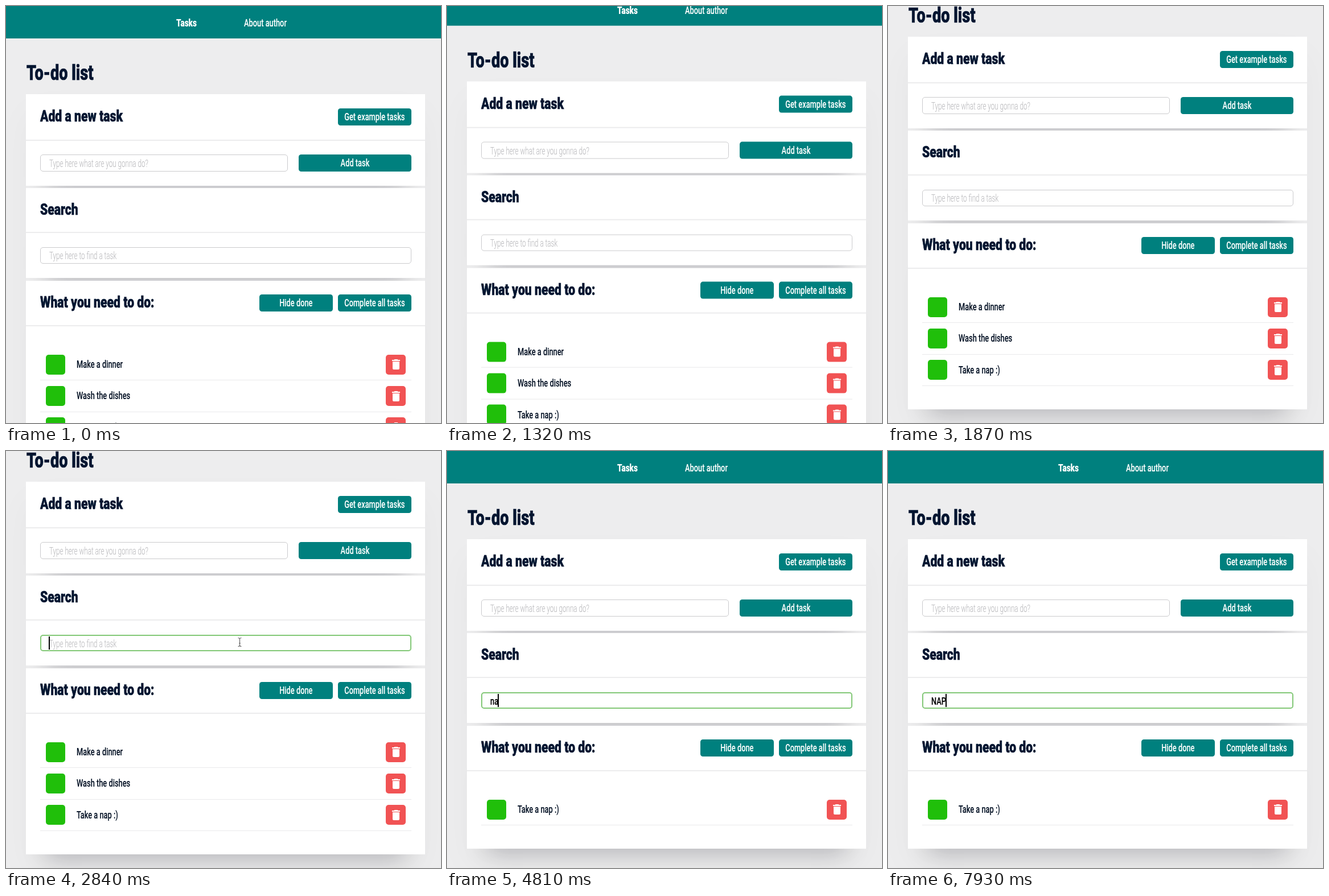
Write an HTML page that moves like this. It is 764 px wide and 733 px high and loops after 8000 ms.

```html
<!DOCTYPE html>
<html lang="en">
<head>
<meta charset="utf-8">
<title>To-do list</title>
<style>
* { box-sizing: border-box; margin: 0; }
html, body { width: 100%; height: 100%; overflow: hidden; background: #ededee; }
body { position: relative; font: 500 18.2px/1 Roboto, sans-serif; color: #061326; }
[hidden] { display: none !important; }
#page { position: absolute; top: 0; left: 0; width: 764px; padding-bottom: 24px; }

/* one condensed cut per weight */
i { display: inline-block; font-style: normal; white-space: nowrap; transform: scaleX(.705); transform-origin: 0 50%; -webkit-text-stroke: .15px; }
h1 i, b i { transform: scaleX(.745); }
h2 i { transform: scaleX(.775); }
h1, h2, b { font-weight: 900; color: #021530; }
h1 i, h2 i { -webkit-text-stroke: .6px; }
h1 { font-size: 36.5px; position: absolute; left: 35.5px; top: 100px; }
h2 { font-size: 27.3px; }

nav { height: 57.3px; background: #00807e; position: relative; }
nav * { color: #fff; }
nav > * { position: absolute; top: 20.5px; }
main { margin: 98px 0 0 35.4px; width: 701px; box-shadow: 0 30px 60px rgba(0, 0, 20, .03); }
section { background: #fff; margin-bottom: 4.7px; box-shadow: 0 44px 40px -36px rgba(0, 0, 20, .22); }
section:last-child { margin: 0; }
header, .body { padding: 0 24.5px; display: flex; align-items: center; gap: 9.5px; }
header { border-bottom: 2px solid #ececed; }
header h2 { flex: 1; white-space: nowrap; }
.body { height: 78.9px; gap: 19.5px; }

.btn { width: 128.5px; height: 29.5px; border-radius: 4.5px; background: #00807e; color: #fff;
  display: flex; align-items: center; justify-content: center; }
.btn i { transform-origin: 50% 50%; }
.field { flex: 1; height: 29.5px; border: 1.2px solid #cbcbcd; border-radius: 5px; position: relative; color: #000; }
.field i { position: absolute; left: 15px; top: 5.5px; }
.field .hint { font-weight: 300; color: #bcbcbf; transform: scaleX(.64); }
.focus { border: 2px solid #83c877; }
.focus i { left: 14px; top: 4.8px; }
#caret { position: absolute; top: 1.5px; width: 1.3px; height: 22.5px; background: #000; }

#list { padding: 40px 24.5px 41px; }
.task { height: 55.2px; padding: 0 10px; border-bottom: 1.2px solid #e9e9eb; display: flex; align-items: center; }
.task i { flex: 1; margin-left: 19.7px; }
.box { width: 34.5px; height: 34.5px; border-radius: 5px; background: #20bf0a; display: flex; align-items: center; justify-content: center; }
.del { background: #f15354; }
.cursor { position: absolute; left: 0; top: 0; overflow: visible; }
</style>
</head>
<body>
<div id="page">
  <nav><b style="left:299px"><i>Tasks</i></b><span style="left:418px"><i>About author</i></span></nav>
  <h1><i>To-do list</i></h1>
  <main>
    <section>
      <header style="height:81.5px"><h2><i>Add a new task</i></h2><div class="btn"><i>Get example tasks</i></div></header>
      <div class="body">
        <div class="field"><i class="hint">Type here what are you gonna do?</i></div>
        <div class="btn" style="width:197.5px"><i>Add task</i></div>
      </div>
    </section>
    <section>
      <header style="height:78.8px"><h2><i>Search</i></h2></header>
      <div class="body">
        <div class="field" id="search"><i class="hint" id="hint">Type here to find a task</i><i id="query"></i><div id="caret"></div></div>
      </div>
    </section>
    <section>
      <header style="height:80.5px"><h2><i>What you need to do:</i></h2><div class="btn"><i>Hide done</i></div><div class="btn"><i>Complete all tasks</i></div></header>
      <div id="list"></div>
    </section>
  </main>
</div>
<svg class="cursor" id="arrow" width="12" height="18"><path d="M0 0V14L3.3 11L5.5 16L8 15L5.8 10.2H10Z" stroke="#fff"/></svg>
<svg class="cursor" id="beam" width="8" height="16"><path d="M-3-7.5Q0-7.5 0-5.5Q0-7.5 3-7.5M0-5.5V5.5M-3 7.5Q0 7.5 0 5.5Q0 7.5 3 7.5M-1.5 2H1.5" fill="none" stroke="#666" stroke-width="1.2"/></svg>

<script>
const $ = id => document.getElementById(id);
const LOOP = 8000, STEP = 77, VIEW = 733;
const page = $('page'), search = $('search'), query = $('query'), hint = $('hint'), caret = $('caret');

const bin = '<svg width="24" height="24" fill="#fff"><path d="M5 4H8.5L9.5 3H14.5L15.5 4H19V6H5ZM6 7H18V19Q18 21 16 21H8Q6 21 6 19Z"/></svg>';
const tasks = ['Make a dinner', 'Wash the dishes', 'Take a nap :)'].map(name => {
  const row = document.createElement('div');
  row.className = 'task';
  row.innerHTML = `<div class="box"></div><i>${name}</i><div class="box del">${bin}</div>`;
  $('list').append(row);
  return { row, name: name.toLowerCase() };
});

// [time, text in the search field, caret phase]
const keys = [
  [2840, '', 85], [3410, 'n'], [3490, 'na'], [3650, 'nap'], [4810, 'na'], [5050, 'n'], [5130, 'n'],
  [6030, ''], [6110, ''], [6600, 'N'], [6760, 'NA'], [6920, 'NAP']
];

function scrollAt(t) {
  if (t < 1160 || t >= 3490) return 0;
  const k = Math.floor((t - 1160) / STEP);
  return t < 1870 ? Math.min(101, 1 + 7.56 * k ** 1.5) : 101.5;
}

function drawSearch(t) {
  const [time, text, phase = 0] = keys.findLast(k => k[0] <= t) || [0, ''];
  const focus = time > 0;
  search.classList.toggle('focus', focus);
  query.textContent = text;
  hint.hidden = text !== '';
  caret.hidden = !focus || (t - time + phase) % 1005 >= 505;
  caret.style.left = 13.5 + query.getBoundingClientRect().width + 'px';
  for (const { row, name } of tasks) row.hidden = !name.includes(text.toLowerCase());
}

function drawCursor(t) {
  const u = Math.min(1, Math.floor((t - 2270) / 80) / 5);
  const ease = 1 - (1 - u) ** 2;
  const x = 681 - 270.5 * ease, y = 187 + 149 * ease;
  const shown = t >= 2270 && t < 4650, overField = y > 322;
  const put = (el, on) => {
    el.style.display = shown && on ? 'block' : 'none';
    el.style.transform = `translate(${x}px, ${y}px)`;
  };
  put($('arrow'), !overField);
  put($('beam'), overField);
}

function frame(now) {
  const t = now % LOOP;
  drawSearch(t);
  drawCursor(t);
  const y = Math.min(scrollAt(t), Math.max(0, page.offsetHeight - VIEW));
  page.style.transform = `translateY(${-y}px)`;
  requestAnimationFrame(frame);
}
requestAnimationFrame(frame);
</script>
</body>
</html>
```
